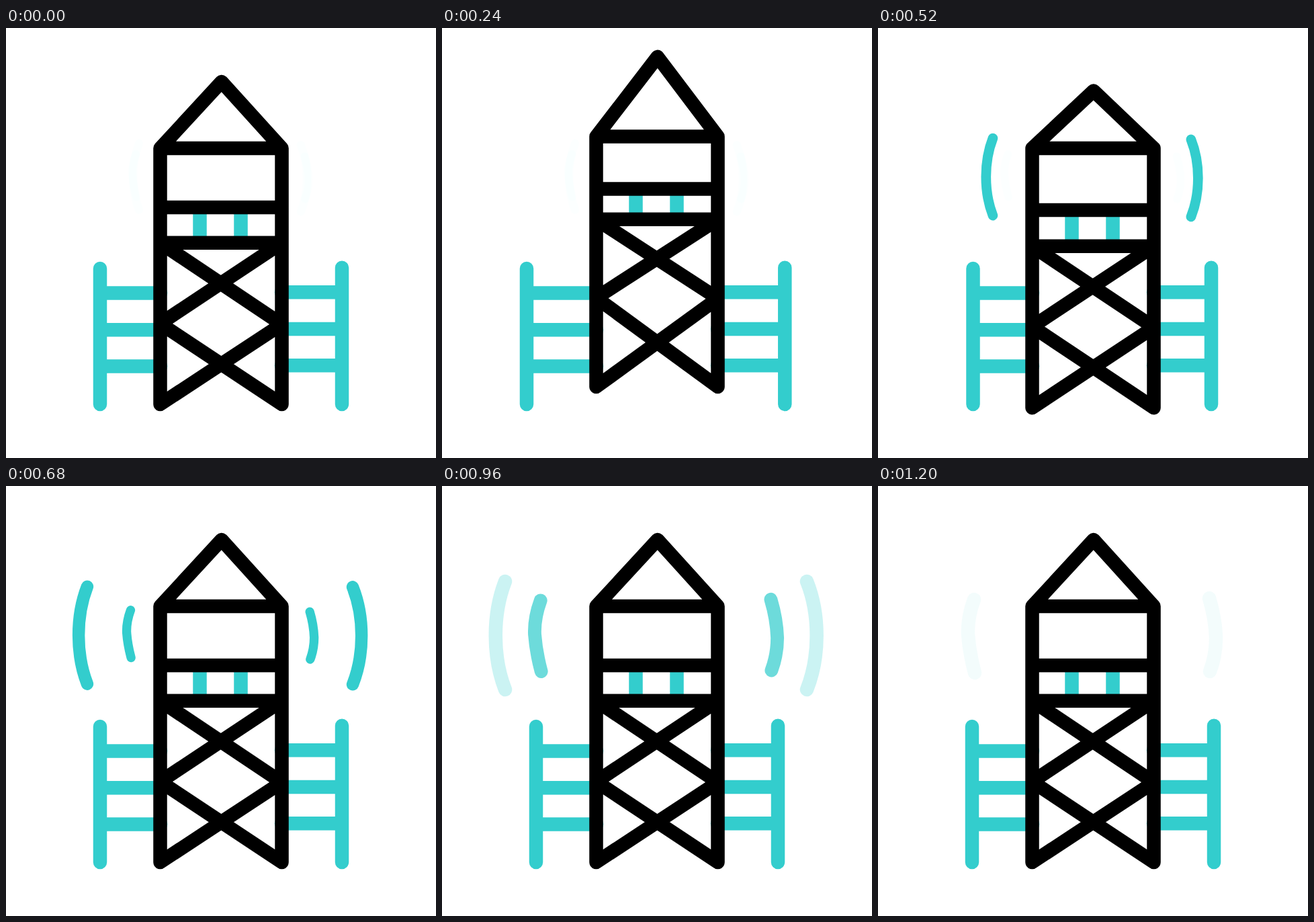
Animation, 640 px wide and 640 px high, one loop 2 s. Source, as an HTML page:

```html
<!DOCTYPE html>
<html lang="en">
<head>
<meta charset="utf-8">
<title>Watchtower</title>
<style>
  html, body { margin: 0; width: 100%; height: 100%; overflow: hidden; background: #fff; }
  svg { display: block; width: 100vw; height: 100vh; }
  path { fill: none; stroke-width: 20.5; stroke-linecap: round; stroke-linejoin: round; }
  .teal { stroke: #33cdcd; }
  .black { stroke: #000; }
  #bars { stroke-linecap: butt; }
</style>
</head>
<body>
<svg viewBox="0 0 640 640">
  <path class="teal" id="fenceL"/>
  <path class="teal" id="fenceR"/>
  <path class="teal" id="bars"/>
  <path class="black" id="tower"/>
  <path class="teal" id="outerL" d="M94 142C75 191 75 254 94 303"/>
  <path class="teal" id="outerR" d="M543 142C562.5 191 562.5 254 543 303"/>
  <path class="teal" id="innerL" d="M143 169Q133 196 134 221Q136 248 144 278"/>
  <path class="teal" id="innerR" d="M493 167Q502 197 503 226Q503 252 494 276"/>
</svg>
<script>
const LOOP = 2000, STEP = 40, LAST = 1200, FAINT = 0.012;
const el = id => document.getElementById(id);
const draw = (id, d) => el(id).setAttribute('d', d);

const ramp = (t, a, b) => Math.min(1, Math.max(0, (t - a) / (b - a)));
const ease = (t, a, b) => { const x = ramp(t, a, b); return x * x * (3 - 2 * x); };

// Rest value, stretch at 280 ms, rebound at 440 ms, back at 600 ms
function bounce(t, rest, up, down) {
  return rest + up * ease(t, 120, 280)
    + (down - up) * ease(t, 280, 440)
    - down * ease(t, 440, 600);
}

function fence(id, x, inner, top, rails) {
  draw(id, `M${x} ${top}V560` + rails.map(y => `M${x} ${y}H${inner}`).join(''));
}

function drawTower(t) {
  const l = 229.5, r = 410.5;
  const apex = bounce(t, 80, -44, 27);
  const eave = bounce(t, 179, -20.7, 0);
  const rail = bounce(t, 267, -32.6, 8);
  const floor = bounce(t, 319.8, -41.5, 10);
  const node = bounce(t, 440, -45.6, 9);
  const foot = bounce(t, 560, -30.8, 10.4);
  draw('tower',
    `M${l} ${foot}V${eave}L320.8 ${apex}L${r} ${eave}V${foot}` +
    [eave, rail, floor].map(y => `M${l} ${y}H${r}`).join('') +
    `M${l} ${floor}L${r} ${node + 1}L${l} ${foot}` +
    `M${r} ${floor}L${l} ${node}L${r} ${foot}`);
  draw('bars', [288.5, 349.5].map(x => `M${x} ${rail}V${floor}`).join(''));
}

// Grows outward from (x + dx, y + dy) at scale s to rest at (x, y)
function wave(id, p, alpha, x, y, dx, dy, s) {
  const q = 1 - p, k = 1 - (1 - s) * q;
  el(id).setAttribute('transform',
    `translate(${x + dx * q} ${y + dy * q}) scale(${k}) translate(${-x} ${-y})`);
  el(id).setAttribute('opacity', alpha);
}

function fade(t, start, outStart, outEnd) {
  const shown = FAINT + (1 - FAINT) * ramp(t, start, start + 120);
  return shown * (1 - ramp(t, outStart, outEnd));
}

function render(t) {
  fence('fenceL', bounce(t, 140, -16.6, 3), 230, 358, [394.5, 449.3, 503.5]);
  fence('fenceR', bounce(t, 500, 12.2, -8), 410, 356.8, [393.3, 448, 502.3]);
  drawTower(t);

  const p1 = ease(t, 360, 840), a1 = fade(t, 360, 840, 1000);
  wave('outerL', p1, a1, 87, 222.5, 106.6, -1.3, 0.615);
  wave('outerR', p1, a1, 550.5, 222.5, -107, 1.3, 0.615);

  const p2 = ease(t, 560, 1040), a2 = fade(t, 560, 855, 1222);
  wave('innerL', p2, a2, 139, 223.5, 52, -4, 0.585);
  wave('innerR', p2, a2, 498, 221.5, -50.5, 1.3, 0.585);
}

const start = performance.now();
function tick() {
  const t = (performance.now() - start) % LOOP;
  render(Math.min(LAST, Math.floor(t / STEP) * STEP));
  requestAnimationFrame(tick);
}
tick();
</script>
</body>
</html>
```
